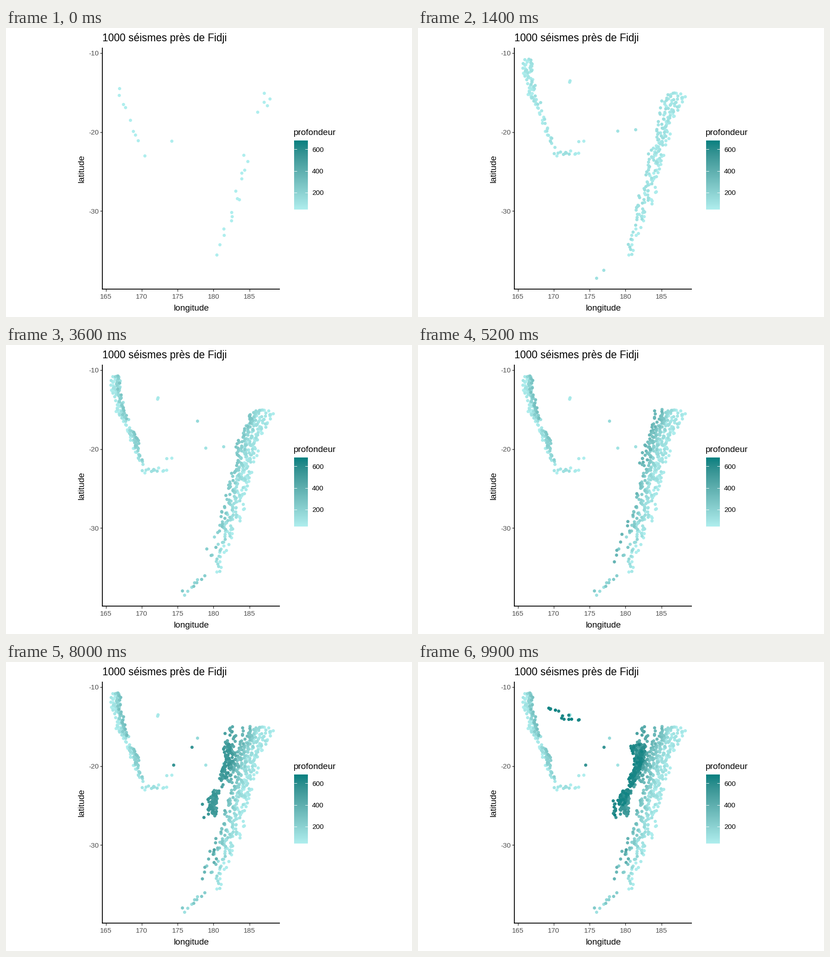
A matplotlib script for the animation above (10000 ms loop, 885 px wide and 632 px high).

```python
import matplotlib.pyplot as plt
import numpy as np
from matplotlib.animation import FuncAnimation

W, H, DPI = 885, 632, 125
FRAMES, INTERVAL = 100, 100
D_MIN, D_MAX = 40, 680
PX = 72 / DPI
GREY = "#4d4d4d"

plt.rcParams["font.family"] = "Liberation Sans"
rng = np.random.default_rng(21)

# --- colour scale, interpolated in CIE Lab ---
RGB2XYZ = np.array([[0.4124, 0.3576, 0.1805],
                    [0.2126, 0.7152, 0.0722],
                    [0.0193, 0.1192, 0.9505]])
WHITE = RGB2XYZ.sum(axis=1)
LAB = np.array([[0, 116, 0], [500, -500, 0], [0, 200, -200]])


def to_lab(rgb):
    c = np.array(rgb) / 255
    lin = np.where(c > 0.04045, ((c + 0.055) / 1.055) ** 2.4, c / 12.92)
    return LAB @ np.cbrt(RGB2XYZ @ lin / WHITE)


def to_rgb(lab):
    xyz = (lab @ np.linalg.inv(LAB).T) ** 3 * WHITE
    lin = np.clip(xyz @ np.linalg.inv(RGB2XYZ).T, 0, 1)
    return np.clip(np.where(lin > 0.0031308,
                            1.055 * lin ** (1 / 2.4) - 0.055, 12.92 * lin), 0, 1)


LOW, HIGH = to_lab((175, 238, 238)), to_lab((0, 128, 128))


def depth_color(depth):
    t = (np.asarray(depth, float)[:, None] - D_MIN) / (D_MAX - D_MIN)
    return to_rgb(LOW + t * (HIGH - LOW))


# --- earthquakes, as rows of x, y, depth on the stage ---
def slab(spine, dip):
    """Plate whose spine (y, x) shifts sideways with depth (depth, shift)."""
    (ys, xs), (ds, shifts) = np.transpose(spine), np.transpose(dip)

    def quakes(n, depths, span, spread):
        # one quake per slice of the span keeps the coverage even
        y = span[0] + (np.arange(n) + rng.random(n)) / n * (span[1] - span[0])
        d = rng.uniform(*depths, n)
        x = np.interp(y, ys, xs) + np.interp(d, ds, shifts)
        return np.column_stack([x + spread * rng.uniform(-1, 1, n), y, d])
    return quakes


def trail(n, depths, start, end, jitter):
    xy = np.linspace(start, end, n) + rng.uniform(-jitter, jitter, (n, 2))
    return np.column_stack([xy, rng.uniform(*depths, n)])


west = slab([(66, 239), (100, 243), (150, 253), (190, 272), (220, 283), (280, 306)],
            [(40, -5), (130, 0), (300, 6)])
east = slab([(140, 541), (200, 521), (250, 508), (310, 492), (360, 482),
             (400, 470), (440, 455), (490, 438)],
            [(40, 26), (130, 12), (200, 0), (376, -18)])
deep = slab([(140, 490), (180, 483), (215, 488), (250, 475), (300, 452), (440, 449)],
            [(377, 6), (480, 0), (680, -10)])

SURFACE, SHALLOW, MIDDLE = (D_MIN, D_MIN), (42, 130), (131, 273)
LOWER, DEEP, DEEPER, DEEPEST = (274, 376), (377, 486), (487, 557), (558, 660)

loners = [(331, 115, 70), (330, 118, 60), (361, 247, 40), (350, 248, 60),
          (435, 225, 100), (474, 222, 110), (417, 166, 150), (365, 225, 550),
          (405, 186, 550)]

quakes = np.vstack([
    loners,
    west(9, SURFACE, (118, 280), 3),
    west(27, SHALLOW, (67, 100), 10),
    west(36, SHALLOW, (100, 165), 9),
    west(18, SHALLOW, (165, 262), 5),
    trail(12, SHALLOW, (300, 275), (348, 271), 4),
    west(42, (131, 310), (66, 162), 4),
    west(22, (131, 270), (185, 225), 6),
    west(6, MIDDLE, (225, 256), 3),

    east(5, SURFACE, (140, 184), 14),
    east(15, SURFACE, (268, 496), 9),
    east(46, SHALLOW, (141, 190), 20),
    east(84, SHALLOW, (190, 300), 13),
    east(56, SHALLOW, (300, 420), 13),
    east(12, SHALLOW, (430, 495), 10),
    east(68, MIDDLE, (142, 240), 8),
    east(42, MIDDLE, (240, 345), 7),
    east(24, MIDDLE, (345, 410), 7),
    east(10, MIDDLE, (415, 470), 20),
    trail(10, (110, 270), (384, 547), (430, 502), 6),
    east(44, LOWER, (138, 265), 9),
    east(16, LOWER, (265, 480), 5),

    deep(50, DEEP, (140, 262), 11),
    deep(5, DEEP, (265, 295), 8),
    deep(22, (440, 486), (295, 336), 6),
    deep(5, DEEP, (405, 440), 4),
    deep(60, DEEPER, (178, 255), 9),
    deep(48, DEEPER, (280, 333), 9),
    deep(30, DEEPEST, (180, 205), 15),
    deep(84, DEEPEST, (205, 272), 9),
    deep(44, DEEPEST, (278, 312), 9),
    trail(11, (540, 660), (428, 306), (428, 339), 3),
    trail(13, (620, D_MAX), (282, 104), (348, 128), 7),
])
quakes = quakes[np.argsort(quakes[:, 2], kind="stable")]
xy, depth = quakes[:, :2] + 0.5, quakes[:, 2]
colors = depth_color(depth)

# --- stage, in pixels from the top left ---
fig = plt.figure(figsize=(W / DPI, H / DPI), dpi=DPI, facecolor="white")
ax = fig.add_axes([0, 0, 1, 1])
ax.axis("off")


def line(x, y, color="black", width=1.85):
    ax.plot(x, y, color=color, lw=width * PX, solid_capstyle="butt")


def label(x, y, text, size=11, color="black", ha="left", **kw):
    ax.text(x, y, text, fontsize=size, color=color, ha=ha, va="baseline", **kw)


LEFT, RIGHT, TOP, BOTTOM = 210, 597, 42.5, 571
for lon in range(165, 186, 5):
    x = 217.5 + (lon - 165) * 15.66
    line([x, x], [BOTTOM, BOTTOM + 5], "#333333", 1.4)
    label(x, 592.5, lon, 8.8, GREY, "center")
for lat in (-10, -20, -30):
    y = 55 - (lat + 10) * 17.25
    line([LEFT - 5, LEFT], [y, y], "#333333", 1.4)
    label(202, y + 5.5, lat, 8.8, GREY, "right")
line([LEFT, LEFT], [TOP, BOTTOM + 1])
line([LEFT - 1, RIGHT], [BOTTOM, BOTTOM])

label(210.5, 28.5, "1000 séismes près de Fidji", 13.1)
label(404, 617.5, "longitude", ha="center")
label(170, 307.5, "latitude", ha="center", rotation=90, rotation_mode="anchor")

# --- legend ---
BAR_L, BAR_R, BAR_T, BAR_B = 627.5, 657.5, 246.5, 397.5
label(627, 234, "profondeur")
ramp = depth_color(np.linspace(D_MAX, D_MIN, 256))[:, None, :]
ax.imshow(ramp, extent=(BAR_L, BAR_R, BAR_B, BAR_T), interpolation="bilinear")
for d in (200, 400, 600):
    y = BAR_B - (d - D_MIN) / (D_MAX - D_MIN) * (BAR_B - BAR_T)
    line([BAR_L, BAR_L + 6], [y, y], "white", 1)
    line([BAR_R - 6, BAR_R], [y, y], "white", 1)
    label(667, y + 5.5, d, 8.8)
ax.set(xlim=(0, W), ylim=(H, 0), aspect="auto")

dots = ax.scatter([], [], s=(7 * PX) ** 2, linewidths=0, zorder=3)


def update(frame):
    limit = D_MIN + (D_MAX - D_MIN) * frame / (FRAMES - 1)
    shown = np.searchsorted(depth, limit, side="right")
    dots.set_offsets(xy[:shown])
    dots.set_facecolor(colors[:shown])
    return dots,


anim = FuncAnimation(fig, update, frames=FRAMES, interval=INTERVAL,
                     repeat=True, repeat_delay=0)
plt.show()
```
